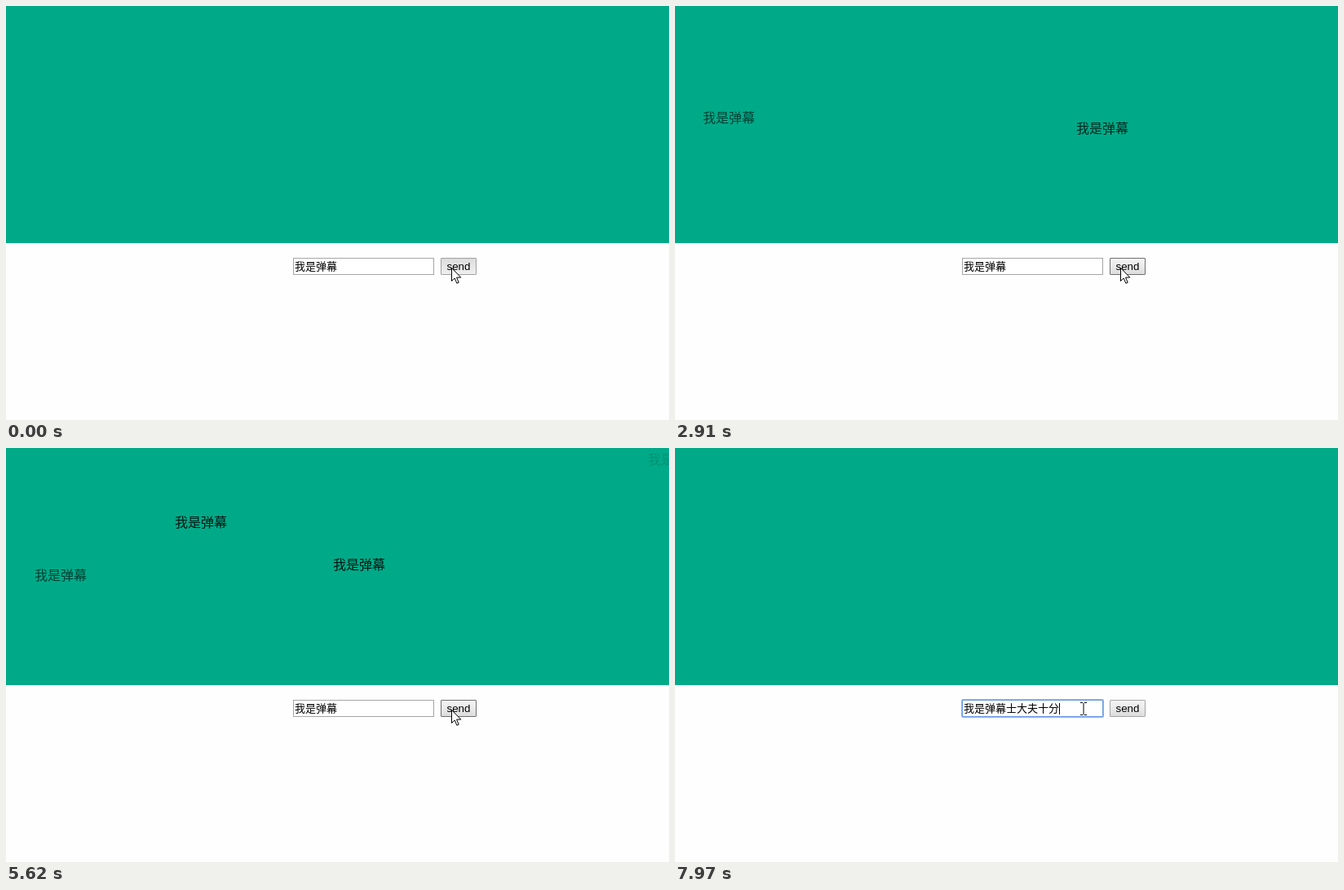
Recreate the animation shown at these times as an HTML page. Size 813 by 508 pixels, loop 8000 ms.

```html
<!DOCTYPE html>
<html lang="zh">
<head>
<meta charset="utf-8">
<style>
  html, body { margin: 0; width: 100%; height: 100%; overflow: hidden; background: #fefefe; }
  body * { position: absolute; box-sizing: border-box; white-space: pre; }
  #stage { left: 0; top: 0; width: 813px; height: 508px; overflow: hidden; color: #000; }
  #wall { left: 0; top: 0; width: 813px; height: 291px; overflow: hidden; background: #0a8; }
  #wall span, #field, #ime { font-family: "Noto Sans CJK SC", "Noto Sans CJK", sans-serif; }
  #wall span { left: 0; font-size: 16px; font-weight: 300; line-height: 14px; }
  #field { left: 352px; top: 309px; width: 173px; height: 21px; padding-left: 1px;
    border: 1px solid #a6a6a6; background: #fff; font-size: 13px; line-height: 17px; }
  #field.focus { border-color: #6b9be8; box-shadow: 0 0 0 1px #8fb3ee; border-radius: 1px; }
  #caret { top: 313px; width: 1px; height: 14px; background: #000; }
  #send { left: 533px; top: 309px; width: 44px; height: 21px; border: 1px solid #a6a6a6; border-radius: 1px;
    background: linear-gradient(#f3f3f3, #ebebeb 45%, #dcdcdc);
    font: 13.333px/19px "Liberation Sans", Arial, sans-serif; text-align: center; }
  #send.hover { border-color: #707070; }
  #send.down { border-color: #a0a0a0; background: linear-gradient(#dcdcdc, #e6e6e6 50%, #efefef); }
  #ime { left: 407px; top: 333px; width: 406px; height: 41px; padding: 2px 8px; background: #fff;
    border: 1px solid #c8c8c8; font-size: 13px; line-height: 18px; }
  svg { left: 0; top: 0; overflow: visible; }
</style>
</head>
<body>
<div id="stage">
  <div id="wall"></div>
  <div id="field"></div>
  <div id="caret"></div>
  <div id="send">send</div>
  <div id="ime">s'd'f's'f
1.士大夫十分</div>
  <svg id="arrow" width="13" height="21"><path d="M.5 .5V16.5L4.2 13L6.9 19.3L9.2 18.3L6.6 12.1H11.8Z" fill="#fff" stroke="#000"/></svg>
  <svg id="beam" width="8" height="16"><path d="M0 .5H3M5 .5H8M4 1V15M0 15.5H3M5 15.5H8" fill="none" stroke="#000"/></svg>
</div>
<script>
const LOOP = 8000, WIDTH = 813, SPEED = 0.637; // speed in px per ms
const TEXT = '我是弹幕', ADDED = '士大夫十分', INK = 0.88;
const AWAY = 6680, FOCUS = 6830, COMPOSE = 7340, COMMIT = 7850;
const $ = id => document.getElementById(id);

// Each comment: entry time and height on the wall.
const comments = Object.entries({
  227: 169, 1060: 76, 1688: 129, 2407: 142, 3175: 8, 3687: 34, 4111: 147,
  4400: 148, 4670: 83, 4975: 135, 5580: 6, 5890: 15, 6594: 152
}).map(([start, top]) => {
  const el = document.createElement('span');
  el.textContent = TEXT;
  el.style.top = top + 'px';
  $('wall').append(el);
  return { el, start: +start };
});

const show = (el, on) => { el.style.display = on ? 'block' : 'none'; };
const place = (el, x, y) => { el.style.transform = `translate(${x}px, ${y}px)`; };

// The button is held shortly before its comment enters.
const pressed = t => comments.some(({ start }) => t >= start - 260 && t < start - 110);

function draw(t) {
  for (const { el, start } of comments) {
    const x = Math.round(WIDTH - (t - start) * SPEED);
    show(el, x < WIDTH && x > -62);
    place(el, x, 0);
    el.style.opacity = INK * Math.max(0, Math.min(1, (853 - x) / 408, (x + 130) / 230));
  }

  const away = t >= AWAY, focus = t >= FOCUS, typed = t >= COMMIT;
  $('send').className = pressed(t) ? 'down' : away ? '' : 'hover';
  $('field').className = focus ? 'focus' : '';
  $('field').textContent = TEXT + (typed ? ADDED : '');
  show($('caret'), focus);
  $('caret').style.left = (typed ? 471 : 406) + 'px';
  show($('ime'), t >= COMPOSE && !typed);

  show($('arrow'), !away);
  place($('arrow'), t < 6010 ? 546 : 549, 321);
  show($('beam'), away);
  place($('beam'), focus ? 497 : 505, 312);
}

function frame() {
  draw(performance.now() % LOOP);
  requestAnimationFrame(frame);
}
frame();
</script>
</body>
</html>
```
